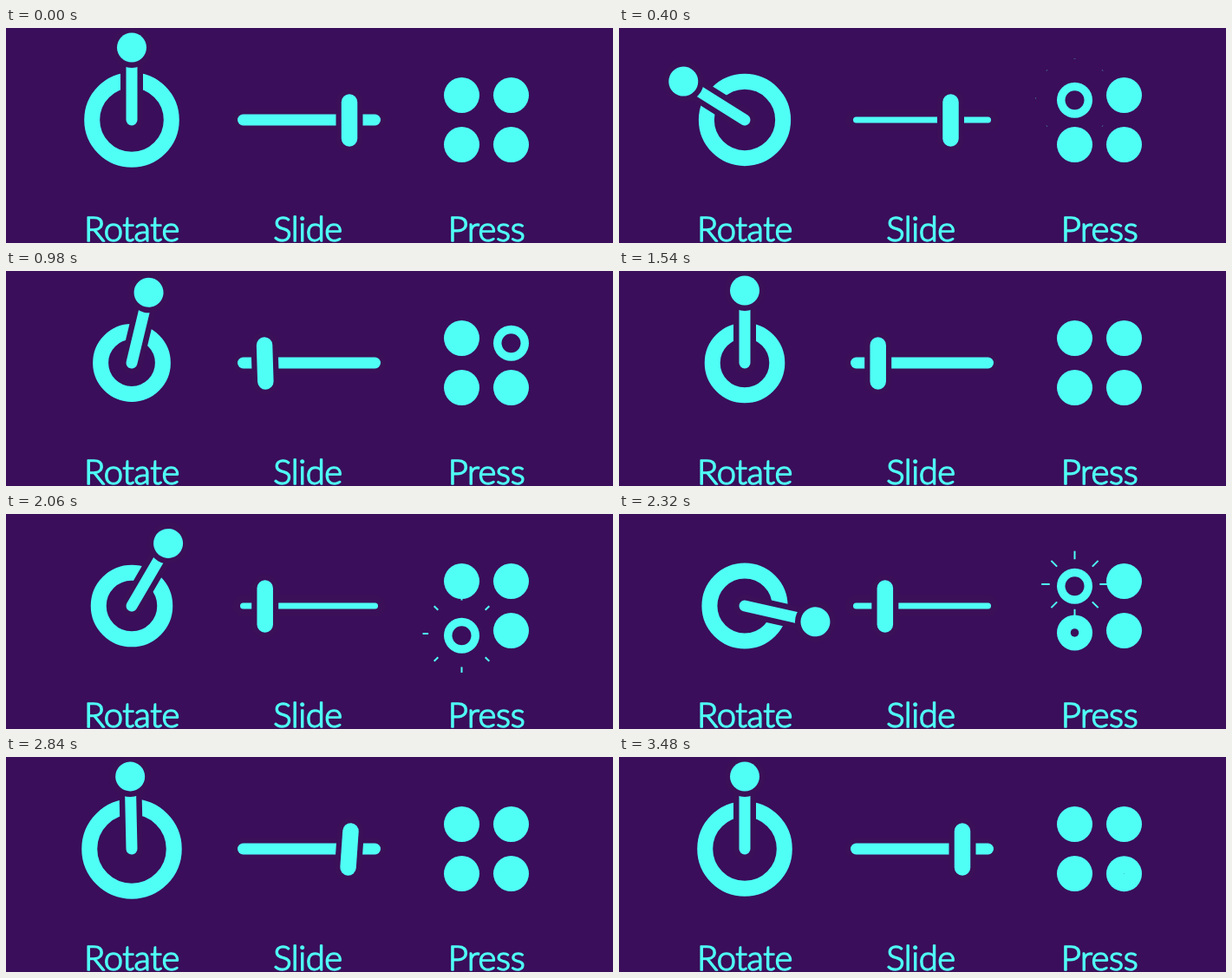
Write an HTML page with a canvas that moves like this. It is 700 px wide and 248 px high and loops after 3500 ms.

```html
<!DOCTYPE html>
<html lang="en">
<head>
<meta charset="utf-8">
<title>Rotate, Slide, Press</title>
<style>
  html, body { margin: 0; width: 100%; height: 100%; overflow: hidden; background: #3a0e5a; }
  canvas { display: block; }
</style>
</head>
<body>
<canvas id="stage" width="700" height="248"></canvas>
<script>
const ctx = document.getElementById('stage').getContext('2d');
const LOOP = 3500, BACK = '#3a0e5a', HALO = '#3b1058', FRONT = '#4ffff5';

const lerp = (a, b, u) => a + (b - a) * u;
const progress = (t, start, end) => Math.min(1, Math.max(0, (t - start) / (end - start)));
const easeOut = u => 1 - (1 - u) ** 3;
const easeInOut = (u, p = 3) => u < .5 ? (2 * u) ** p / 2 : 1 - (2 - 2 * u) ** p / 2;

function line(x1, y1, x2, y2, width, color = FRONT, cap = 'round') {
  ctx.lineCap = cap;
  ctx.lineWidth = width;
  ctx.strokeStyle = color;
  ctx.beginPath();
  ctx.moveTo(x1, y1);
  ctx.lineTo(x2, y2);
  ctx.stroke();
}

function disc(x, y, r, color = FRONT) {
  ctx.fillStyle = color;
  ctx.beginPath();
  ctx.arc(x, y, r, 0, 2 * Math.PI);
  ctx.fill();
}

// The dial accelerates through a full turn and stops dead; its ring overshoots, then settles.
function drawDial(t) {
  const back = t >= 1783;
  const u = back ? progress(t, 1783, 2843) ** 1.85 : progress(t, 0, 1000) ** 2;
  const settle = back ? easeOut(progress(t, 2843, 3200)) : easeOut(progress(t, 1000, 1360));
  const radius = back ? lerp(37.3, 48.8, u) - 3 * settle : lerp(45.8, 35.5, u) + 1.8 * settle;

  ctx.save();
  ctx.translate(145, 106);
  ctx.lineWidth = 18;
  ctx.strokeStyle = FRONT;
  ctx.beginPath();
  ctx.arc(0, 0, radius, 0, 2 * Math.PI);
  ctx.stroke();
  ctx.rotate((back ? u : -u) * 2 * Math.PI);
  line(0, 0, 0, -80, 26, HALO);
  line(0, 0, 0, -80, 13);
  disc(0, -83.5, 23.5, HALO);
  disc(0, -83.5, 17);
  ctx.restore();
}

// The track thins while the handle travels; the handle wobbles on arrival.
function drawSlider(t) {
  const back = t >= 1800;
  const start = back ? 2142 : 189, end = start + 650;
  const u = easeInOut(progress(t, start, end));
  const x = back ? lerp(298.7, 396, u) : lerp(396, 298.7, u);
  const thin = back ? progress(t, 1870, 2040) : progress(t, 20, 190);
  const thick = progress(t, end - 110, end + 40);
  const since = Math.max(0, t - end);
  const tilt = 7.3 * Math.exp(-since / 150) * Math.sin(since * 2 * Math.PI / 360) * (back ? 1 : -1);

  line(273.5, 106, 425.5, 106, 25, HALO);
  line(273.5, 106, 425.5, 106, 13 - 6 * (easeInOut(thin) - easeInOut(thick)));
  ctx.save();
  ctx.translate(x, 106.5);
  ctx.rotate(tilt * Math.PI / 180);
  line(0, -21, 0, 21, 31, HALO);
  line(0, -21, 0, 21, 18.5);
  ctx.restore();
}

const buttons = [
  { x: 525.5, y: 77.5, presses: [40, 2130] },
  { x: 582.5, y: 77.5, presses: [570] },
  { x: 525.5, y: 134.5, presses: [1770] },
  { x: 582.5, y: 134.5, presses: [2870] }
];

function drawSparks({ x, y }, age) {
  const u = progress(age, 100, 364);
  if (u <= 0 || u >= 1) return;
  const head = lerp(20, 45.5, easeOut(u)), tail = lerp(20, 45.5, u);
  for (let i = 0; i < 8; i++) {
    const c = Math.cos(i * Math.PI / 4), s = Math.sin(i * Math.PI / 4);
    line(x + c * tail, y + 3.5 + s * tail, x + c * head, y + 3.5 + s * head, 2, FRONT, 'butt');
  }
}

function drawButtons(t) {
  const ages = buttons.map(b => t - (b.presses.findLast(p => p <= t) ?? Infinity));
  buttons.forEach((b, i) => drawSparks(b, ages[i]));
  buttons.forEach(({ x, y }, i) => {
    const age = Math.max(0, ages[i] === -Infinity ? 0 : ages[i]);
    const down = easeInOut(progress(age, 0, 140), 2) - easeInOut(progress(age, 460, 630), 2);
    disc(x, y + 5.7 * down, 20.5);
    if (down > 0) disc(x, y + 5.7 * down, 11 * down, BACK);
  });
}

function drawLabels() {
  ctx.font = '300 40px Lato, "Open Sans", sans-serif';
  ctx.letterSpacing = '-0.4px';
  ctx.textAlign = 'center';
  ctx.lineJoin = 'round';
  ctx.lineWidth = 1.5;
  ctx.fillStyle = ctx.strokeStyle = FRONT;
  for (const [label, x] of [['Rotate', 145], ['Slide', 348], ['Press', 554]]) {
    ctx.fillText(label, x, 246);
    ctx.strokeText(label, x, 246);
  }
}

function draw(now) {
  const t = now % LOOP;
  ctx.fillStyle = BACK;
  ctx.fillRect(0, 0, 700, 248);
  drawDial(t);
  drawSlider(t);
  drawButtons(t);
  drawLabels();
  requestAnimationFrame(draw);
}
requestAnimationFrame(draw);
</script>
</body>
</html>
```
